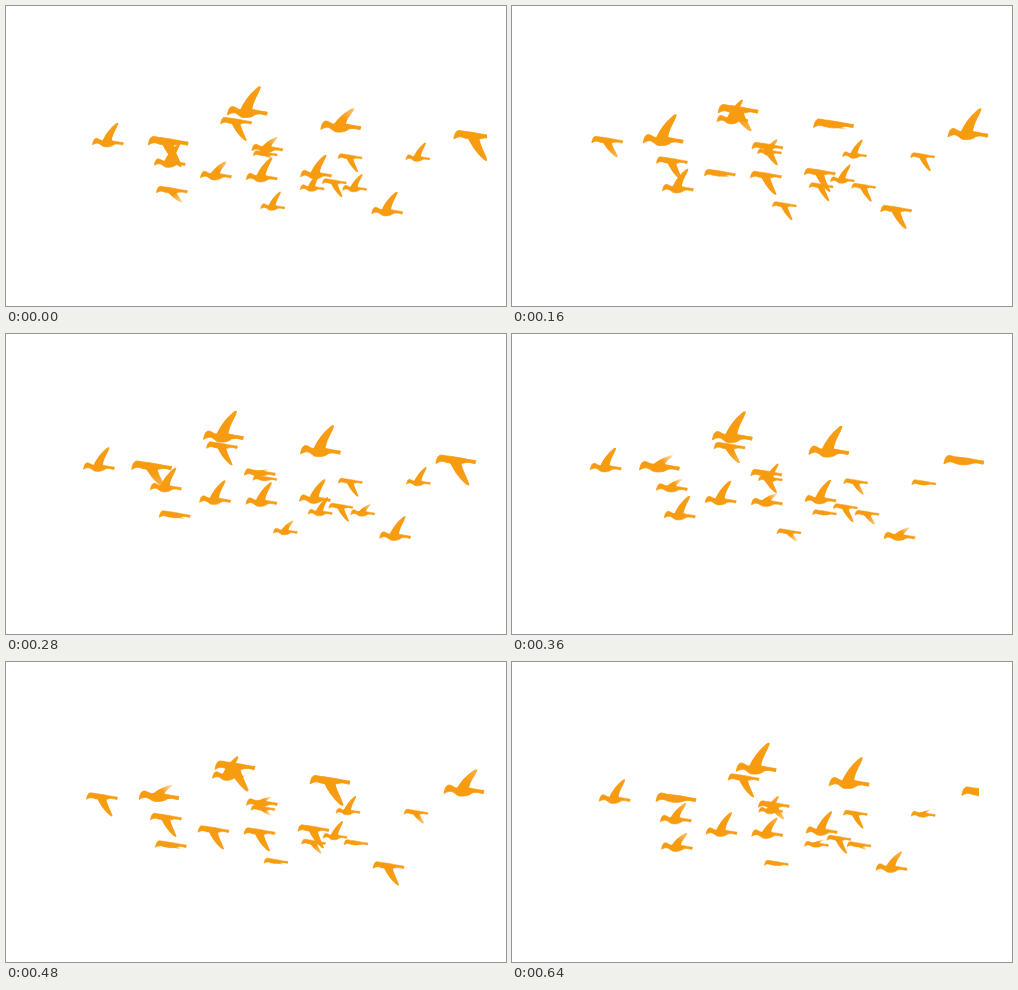
Recreate the animation shown at these times as an HTML page. Size 500 px wide and 300 px high, loop 0.68 s.

```html
<!DOCTYPE html>
<html lang="en">
<head>
<meta charset="utf-8">
<title>Flock</title>
<style>
html, body { margin: 0; width: 100%; height: 100%; overflow: hidden; background: #fff; }
svg { display: block; width: 500px; height: 300px; }
</style>
</head>
<body>
<svg viewBox="0 0 500 300">
  <defs><clipPath id="edge"><rect id="view" height="300"/></clipPath></defs>
  <g id="flock" clip-path="url(#edge)"></g>
</svg>
<script>
const COLOR = "#f79b10";
const STEP = 40, STEPS = 17, MID = 3, BEAT = 7.3;

// Three sizes of bird; each has a centre x, tail y and the step of its highest wing.
const groups = [
  { size: 40, birds: [[153, 137, -2.8], [229, 107, -0.8], [324, 121.5, -1.3], [458, 131, -3.1]] },
  { size: 31, birds: [
    [96, 137, -0.8], [160, 157.5, 0.2], [165, 185, -2.3], [222, 116, 3.5], [256, 143, 1.4],
    [207.5, 170, -1.3], [253.5, 172, 0.2], [307.5, 169, -0.4], [382.5, 206, 0.2]
  ] },
  { size: 24, birds: [
    [257, 148, -2.1], [307.5, 182, 0.6], [329, 176, 3.1], [350, 182.5, 1.1],
    [342, 151, 3.5], [270, 201, 1], [410, 152, 0.6]
  ] }
];

const clamp = (v, lo, hi) => Math.min(hi, Math.max(lo, v));

function set(el, attrs) {
  for (const key in attrs) el.setAttribute(key, attrs[key]);
}
function add(parent, tag, attrs = {}) {
  const el = document.createElementNS("http://www.w3.org/2000/svg", tag);
  set(el, attrs);
  return parent.appendChild(el);
}

const flock = document.getElementById("flock");
const view = document.getElementById("view");

function makeBird(size, [x, y, peak]) {
  const id = "fade" + flock.childElementCount;
  const g = add(flock, "g");
  const fade = add(g, "linearGradient", {
    id, gradientUnits: "userSpaceOnUse", x1: 0.45, x2: 0.8, y1: -0.1
  });
  add(fade, "stop", { offset: 0.35, "stop-color": COLOR });
  const tip = add(fade, "stop", { offset: 1, "stop-color": COLOR });
  const wing = add(g, "path", { fill: `url(#${id})` });
  const body = add(g, "path", {
    fill: COLOR, stroke: COLOR, "stroke-width": 0.02, "stroke-linejoin": "round"
  });
  // Far and low birds slide right, near and high ones slide left.
  const drift = 0.035 * (y - 155) - 0.12 * (size - 30);
  return { size, x: x - size / 2, y, peak, drift, g, fade, tip, wing, body };
}

const birds = groups.flatMap(({ size, birds }) => birds.map(b => makeBird(size, b)));

// Both paths are one unit long, beak at 0 and tail at 1.
function bodyPath(lift) {
  const up = clamp(lift * 2, 0, 1);
  const back = -0.17 + 0.05 * up, belly = 0.03 + 0.06 * up;
  return `M0,.01C.02,-.1 .05,-.2 .13,-.2C.2,-.2 .25,${back} .35,${back}` +
    `L.6,-.13C.75,-.1 .85,-.08 1,-.06L.98,.02C.88,-.01 .78,-.03 .7,0` +
    `C.6,${belly} .42,${belly} .34,${belly - 0.03}C.26,0 .2,-.06 .12,-.04C.07,-.03 .04,-.01 0,.01Z`;
}

function wingPath(lift) {
  const root = -0.1;
  const y = f => (root - (root + lift) * f).toFixed(3);
  return `M.31,${y(0)}Q.47,${y(0.58)} .74,${y(0.95)}Q.82,${y(1.05)} .84,${y(0.97)}` +
    `C.78,${y(0.65)} .65,${y(0.42)} .62,${y(0)}Z`;
}

function drawBird(b, k, shift) {
  const t = k - MID;
  const lift = clamp(0.08 + Math.cos((k - b.peak) * 2 * Math.PI / BEAT), -0.56, 0.7);
  const full = lift > 0 ? lift / 0.7 : -lift / 0.56;
  const x = b.x + b.drift * t + shift, y = b.y - 0.5 * t;
  set(b.g, { transform: `translate(${x.toFixed(2)} ${y.toFixed(2)}) scale(${b.size})` });
  set(b.fade, { y2: -lift });
  set(b.tip, { "stop-opacity": clamp(1.3 * full - 0.35, 0.15, 1) });
  set(b.wing, { d: wingPath(lift) });
  set(b.body, { d: bodyPath(lift) });
}

// The flight runs forward, then back, with a sideways jolt at the seam.
function draw(step) {
  const k = step < 8 ? step : 15 - step;
  set(view, { width: k < 0 ? 467 : 481 });
  birds.forEach(b => drawBird(b, k, k <= 0 ? 3.7 : 0));
}

const start = performance.now();
function tick() {
  draw(Math.floor((performance.now() - start) / STEP) % STEPS);
  requestAnimationFrame(tick);
}
tick();
</script>
</body>
</html>
```
